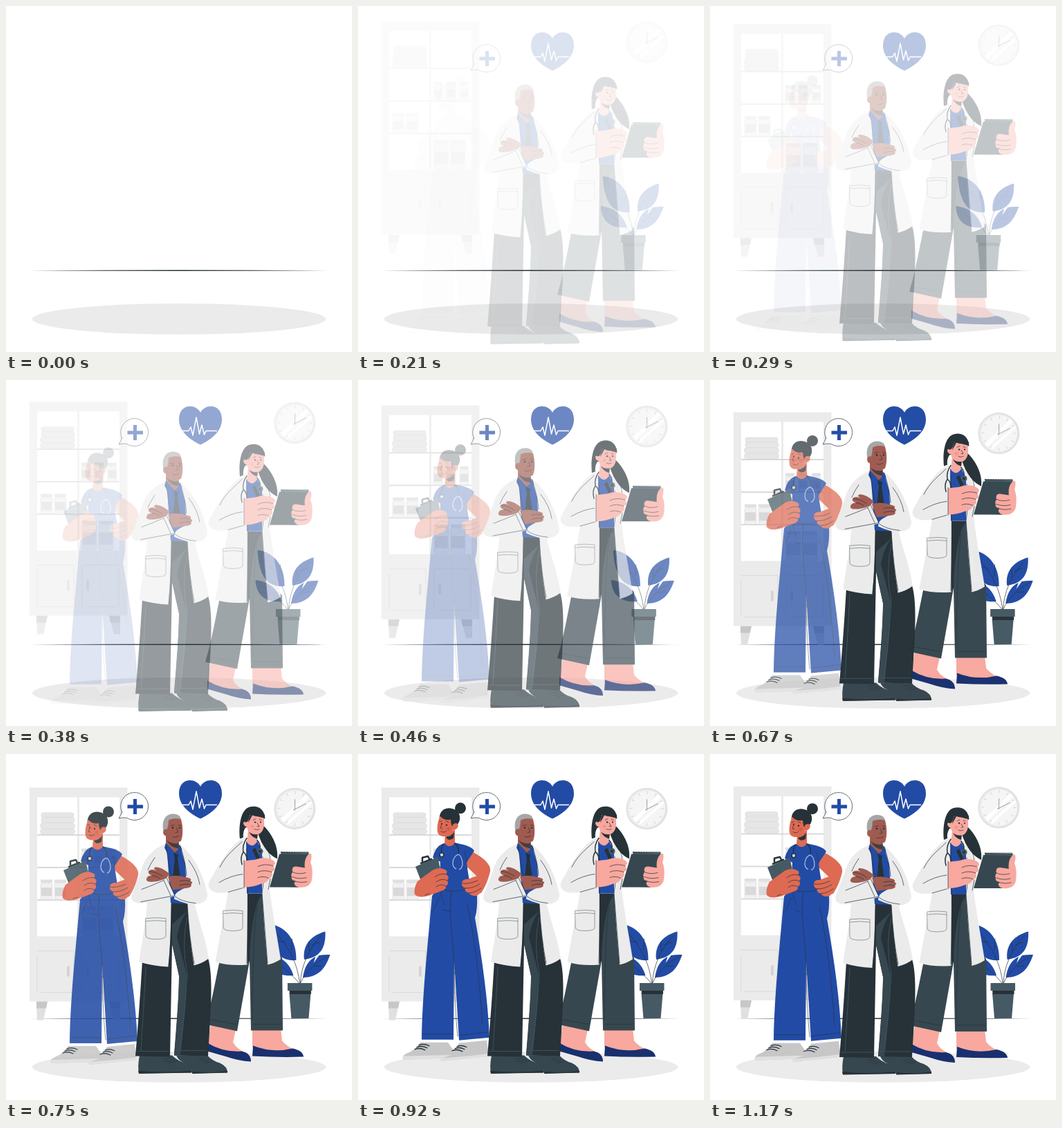
Recreate the animation shown at these times as an HTML page. Size 500 px wide and 500 px high, loop 1210 ms.

```html
<!DOCTYPE html>
<html lang="en">
<head>
<meta charset="utf-8">
<title>Medical team</title>
<style>
html, body { margin: 0; width: 100%; height: 100%; overflow: hidden; background: #fff }
svg { display: block; width: 100vw; height: 100vh }
.blue { fill: #224ba5 } .dark { fill: #263238 } .slate { fill: #37474f } .steel { fill: #455a64 }
.coat { fill: #ebebeb } .white { fill: #fff }
.tan { fill: #de6a53 } .brown { fill: #9f5b50 } .pink { fill: #f8a89f } .navy { fill: #19306f }
.ln { fill: none; stroke: #263238; stroke-width: .7; stroke-linecap: round; stroke-linejoin: round }
.soft { fill: none; stroke: #7d878c; stroke-width: .8; stroke-linecap: round }
.pale { fill: none; stroke: #d6d6d6; stroke-width: .9 }
</style>
</head>
<body>
<svg viewBox="0 0 500 500">
<ellipse cx="250" cy="452.3" rx="212" ry="22.4" fill="#ebebeb"/>
<path class="dark" d="M35 382.3Q250 380.9 465 382.3Q250 383.8 35 382.3Z"/>

<g id="shelf">
  <path fill="#e0e0e0" d="M44 356H60L54 383H45ZM149 356H165V383H156Z"/>
  <path fill="#c7c7c7" d="M44 356H60L58 366H44ZM149 356H165V366H151Z"/>
  <path class="coat" d="M34 47H175.500V356H34Z"/>
  <path class="white" d="M45 61H103V262H45ZM106 61H164V262H106Z"/>
  <path stroke="#d9d9d9" stroke-width="2" d="M45 115.500H164M45 162.500H164M45 209.500H164"/>
  <path class="pale" d="M45 343V290M45 283H98V335M50 343H98M110 343V283H163M163 290V343H118"/>
  <path fill="#d4d4d4" d="M88 305h4v15h-4zM116 305h4v15h-4z"/>
  <g fill="#e6e6e6" stroke="#dbdbdb" stroke-width=".7">
    <rect x="51" y="83.500" width="47" height="7" rx="3"/><rect x="51" y="90" width="48" height="8" rx="3.500"/>
    <rect x="49.500" y="98" width="50" height="8.500" rx="4"/><rect x="49.500" y="106.500" width="50" height="8" rx="4"/>
  </g>
  <g id="jars"></g>
</g>

<g id="clock">
  <circle cx="417.300" cy="77.500" r="30" fill="#e0e0e0"/>
  <circle cx="416.800" cy="77.500" r="28" fill="#ebebeb"/>
  <circle cx="417.800" cy="77.500" r="26" fill="#f5f5f5"/>
  <path class="white" d="M397 93L434 57L438 61L401 97ZM404 99L441 66L442 70L407 101Z"/>
  <circle cx="417.500" cy="77.500" r="23" fill="none" stroke="#d0d0d0" stroke-width="4" stroke-dasharray=".9 11.143" transform="rotate(-1 417.500 77.500)"/>
  <path fill="none" stroke="#a6a6a6" stroke-width="1.100" d="M417.500 80V64M415 79.500L434 70"/>
</g>

<g id="heart">
  <path class="blue" d="M281 47C275 34 250 33 250 57C250 75 267 87 281 93.500C295 87 312 75 312 57C312 33 287 34 281 47Z"/>
  <path fill="none" stroke="#fff" stroke-width="1.500" stroke-linejoin="round" d="M255 73.500H264L267 68L270 80L275 54L279.500 78L283 65L286.500 79L289 73.500H305"/>
</g>

<g id="bubble">
  <path class="ln" style="fill:#fff" d="M167.500 84A20 20 0 1 1 174.500 92.200Q169 91.500 163 93Q166 89 167.500 84Z"/>
  <path class="blue" d="M184 65h5v8.500h9v5h-9V87h-5V78.500h-8.500v-5H184Z"/>
</g>

<g id="plant">
  <path class="blue" d="M418 298C392 300 381 282 379 246C402 248 419 268 418 298ZM429.500 297C427 275 440 262 460 256.500C461 280 453 294 429.500 297ZM427.500 323C430 306 437 297 446 293L443 302L451 291Q459 289.500 467 290C460 311 449 323 427.500 323ZM414 320C394 322 377 314 376 289C395 291 409 302 414 320Z"/>
  <path class="ln" d="M423 331C420 305 409 278 384 254M424 331C425 308 435 282 455 262M424 331C432 315 445 302 462 293M422 331C412 318 396 306 380 294M411 283L412 267M402 272L389 270M437 284L436 273M441 276L452 272M444 307L454 306"/>
  <path class="steel" d="M408 346H439L436 382H411Z"/>
  <path class="dark" d="M408 341H439.500V347H408.500Z"/>
  <path class="steel" d="M405.500 331H441V342H405.500Z"/>
</g>

<g id="woman">
  <path class="pink" d="M296 392L332 400L328 418Q333 427 342 431Q318 441 291 423ZM356 398H397L399 416Q406 424 415 428Q385 439 356 426Z"/>
  <path class="navy" d="M291 419Q314 433 341 431Q354 434 354 446Q336 445 319 439L291 431ZM357 423Q385 434 414 427Q429 430 430 439Q392 440 356 438Z"/>
  <path class="slate" d="M349 203H371C374 244 380 275 399 296L400 401H354L352 300L334 402L288 392C302 345 306 302 320 255Z"/>
  <path class="dark" d="M349 203H371L364 214Q353 248 352 300L348 304Z"/>
  <path class="ln" d="M293 385L333 392M357 392H397M363 222Q357 250 356 385"/>
  <path class="coat" d="M343 123C325 131 305 165 293 188C290 201 307 204 321 201C315 236 308 270 302.500 302Q322 308 348.500 306L349 203H370Q373 254 378 306Q388 304 397 298C391 260 384 225 381 196L385 175C383 151 376 136 363 124Z"/>
  <path class="blue" d="M347 128L362 125L370 142V203H348Z"/>
  <path class="dark" d="M364 116C369 108 371 104 373 106C385 118 394 136 392 153C381 148 371 137 364 116Z"/>
  <path class="pink" d="M350 111L364 115L363 128Q356 139 348 129Z"/>
  <path class="dark" d="M351 114Q357 119 364 116L363 124Q355 122 351 114Z"/>
  <path class="dark" d="M338 124C336 105 339 82 352 78C363 75 373 80 374.500 94L367 101L346 108Q342 114 343 122Z"/>
  <path class="pink" d="M346 100C350 101 351 95 353 89Q362 93 372.500 92C374 104 373 113 366 117C358 119 350 116 348 107Q344 106 343 102Q343 98 346 100Z"/>
  <path class="dark" d="M350 101Q351 92 356 84L374 89L373 94Q363 92 357 88Q354 94 350 101Z"/>
  <path class="ln" d="M357 97L361 95M366 96L369 97M363 101L366 106L363 106M359 110Q362 112 366 110"/>
  <circle class="dark" cx="360" cy="100" r="1.200"/><circle class="dark" cx="368" cy="100" r="1.100"/>
  <circle cx="356" cy="106" r="2.200" fill="#f08379" opacity=".6"/>
  <path class="ln" d="M341 128C334 136 318 146 309 165M308 187Q325 177 342 175M321 201L342 195M348 138Q351 225 348 304M371 150Q374 180 370 203L378 304M369 128Q381 140 382 154M382 182L379 197"/>
  <path class="ln" style="stroke-width:1.500" d="M348 123Q341 133 343 143M343 143Q338 150 341 161M343 143Q349 146 348 160M363 126Q370 134 365 143"/>
  <circle class="steel" cx="367" cy="142" r="4.500"/><circle class="dark" cx="367" cy="142" r="2"/>
  <path class="dark" d="M356 140L360 137L377 174L373 177Z"/>
  <path class="soft" d="M314 228Q328 226 342 228V252Q342 257 328 257Q314 257 314 252ZM314 232Q328 230 342 232"/>
  <g transform="translate(-2 0)">
    <path class="steel" d="M400 143L440 144L426 194L384 193Z"/>
    <path class="slate" d="M397 146L438 147L424 194H383Z"/>
    <path fill="none" stroke="#263238" stroke-width="2" stroke-dasharray="1.200 1.200" d="M399 143.500H439"/>
  </g>
  <path class="pink" d="M432 166C430 153 436 146 440 145Q443 147 440 158Q444 167 442 183C440 194 428 196 420 193Q414 189 419 185Q411 184 413 179Q411 177 414 172Q412 164 419 164Z"/>
  <path class="ln" d="M414 172Q422 176 433 173M414 179Q424 183 434 180M419 186Q427 188 435 186"/>
  <path class="pink" d="M344 156L361 154Q373 149 386 155Q392 160 386 163Q391 169 384 172Q387 179 380 181Q379 187 369 189Q357 194 344 194Z"/>
  <path class="ln" d="M386 163Q374 159 364 164M384 172Q373 168 364 172M380 181Q372 177 364 180M344 155V195"/>
</g>

<g id="nurse">
  <path fill="#c7c7c7" d="M90 418H130L137 428Q139 434 132 437L121 441L66 443Q61 437 75 432Q84 427 90 418ZM146 419L186 415L189 438L121 445Q114 439 132 433Q141 430 146 419Z"/>
  <path fill="#e0e0e0" d="M65 438L135 436L121 441L66 443ZM118 441Q155 439 189 434V438L120 445Z"/>
  <path class="ln" style="stroke-width:1.300" d="M82 428Q89 425 97 429M85 425Q92 422 100 426M88 422Q95 419 103 423M136 430Q143 427 151 431M140 427Q147 424 154 428M143 424Q150 421 157 425"/>
  <path class="tan" d="M160 140C181 150 193 161 191 171C188 184 183 195 178 202L165 206L157 196L172 178L153 160Z"/>
  <path class="blue" d="M118 193H160L172 205Q173 226 169 238C180 300 188 360 190 411L146 415L139 300L138 414L92 414C93 350 100 285 107 206Z"/>
  <path class="blue" d="M122 131Q112 135 108 151L119 157L117 206L168 207Q161 192 157 158L168 141C163 134 153 132 137 129Z"/>
  <path class="ln" d="M116 195Q140 204 160 195M120 197Q120 212 126 220M135 200Q131 225 138 285M138 285L140 320M139 316Q140 370 144 409M94 406H137M146 408L188 403M117 208Q113 222 108 228M158 220Q173 286 180 392M122 226L133 229M157 158Q156 147 154 143" opacity=".85"/>
  <path class="tan" d="M126 118L140 110L140 130Q132 139 125 130Z"/>
  <path class="dark" d="M127 121Q134 121 139 114L138 123Q130 128 127 121Z"/>
  <circle class="dark" cx="148" cy="79.500" r="8"/>
  <path class="dark" d="M118 91C120 79 132 77 141 82C149 87 149 98 143 104L137 106L134 96Z"/>
  <path class="tan" d="M119 90Q125 96 134 95Q135 101 137 103Q143 99 145 104Q144 111 137 111C134 120 123 123 117 118C113 114 114 101 119 90Z"/>
  <path class="dark" d="M117 94Q120 82 130 84L139 99L136 106Q134 101 134 96Q124 98 119 91Z"/>
  <path class="ln" d="M118 99L121 98M127 98L131 100M121 103L119 108L122 109M120 113Q125 116 128 112"/>
  <circle class="dark" cx="121" cy="102" r="1.100"/><circle class="dark" cx="128" cy="104" r="1.200"/>
  <circle cx="131" cy="109" r="2.300" fill="#c94e3d" opacity=".6"/>
  <path class="ln" style="stroke-width:1.400" d="M124 131Q119 138 121 145M140 130Q147 136 145 146"/>
  <path fill="none" stroke="#a7b7db" stroke-width="1.300" d="M145 146Q137 149 137 160Q138 166 142 167M145 146Q151 150 151 161Q150 167 146 168"/>
  <circle class="dark" cx="121" cy="147" r="3.800"/><circle cx="121" cy="147" r="2.200" fill="#c9d2e8"/>
  <path class="steel" d="M83 164L115 150L124 190L99 205Z"/>
  <path class="ln" style="stroke-width:2.500" d="M91 159L106 153M93 156L93 151L101 149L103 153"/>
  <path class="tan" d="M86 185Q98 176 108 169Q118 164 125 168Q131 170 127 175Q133 178 129 184Q132 189 127 192Q128 197 121 199L105 205Q88 211 82 204Q80 196 86 185Z"/>
  <path class="ln" d="M127 175Q119 173 111 179M129 184Q121 180 113 186M127 192Q120 188 113 193M97 205L103 203"/>
  <path class="tan" d="M150 187Q151 182 159 182L173 177Q183 181 181 191Q180 200 172 206Q163 207 160 202Q153 200 155 195Q149 193 150 187Z"/>
  <path class="ln" d="M150 188Q160 190 173 184M155 195Q165 196 176 189M160 202Q169 202 178 195"/>
</g>

<g id="man">
  <path class="slate" d="M193 437L240 437Q247 444 258 448Q268 453 268 462L192 463Q190 452 193 437ZM246 437L291 437Q298 445 309 448Q320 453 320 462L269 463Q267 452 256 447Q249 444 246 437Z"/>
  <path class="dark" d="M191 459Q230 463 268 459V462L192 463.500ZM269 460Q298 463 320 459V462L269 463.500Z"/>
  <path class="ln" d="M227 443L239 440M231 446L243 443M236 448L247 445M279 443L290 440M283 446L294 443M288 448L298 445"/>
  <path class="dark" d="M239 216H263C270 252 286 278 293 300C300 330 295 385 292 438L243 437C246 398 250 350 250 322L240 276L237 439L187 438C191 392 194 350 197 300Z"/>
  <path class="slate" d="M262 228Q250 245 247 266L261 320Q259 375 252 437H243Q250 360 250 322L240 276V248Z"/>
  <path class="soft" d="M202 309Q199 370 195 430M190 431H235M246 430H290M262 237Q253 275 262 320Q259 375 252 428" style="stroke:#455a64"/>
  <path class="coat" d="M233 130C210 139 199 154 195 171L182 204C178 217 192 219 204 216C202 250 195 278 192.500 302Q212 308 234.500 309C238 280 238 245 239 216H262Q264 260 271.500 307Q284 304 293 297C288 265 277 240 273 219Q291 217 291 205C286 176 272 148 251 132Z"/>
  <path class="blue" d="M232 131L251 133L259 160L262 218L238 217Z"/>
  <path class="dark" d="M242 144L249 147L248 153L252 181H241L244 153Z"/>
  <path class="brown" d="M231 112L250 125L249 140L243 144L231 133Z"/>
  <path class="dark" opacity=".75" d="M232 126Q241 133 250 130L249 138Q238 137 232 126Z"/>
  <path class="blue" d="M231 130L243 143L237 152L229 137ZM251 133L247 143L252 151L254 139Z"/>
  <path fill="#a6a6a6" d="M227 111C225 96 231 88 242 88C250 88 254 93 253 99L236 106L233 119L229 117Z"/>
  <path class="brown" d="M233 110Q235 103 235 97Q244 93 253 96C256 107 256 119 253 127C247 132 236 129 233 120Q227 120 227 114Q228 109 233 110Z"/>
  <path class="ln" d="M238 105L243 104M249 104L253 105M246 108L249 114L245 115M241 121Q245 123 250 120"/>
  <circle class="dark" cx="241" cy="108" r="1.300"/><circle class="dark" cx="251" cy="108" r="1.200"/>
  <path class="ln" d="M231 133Q235 160 239 178M252 134Q260 160 261 177M215 151Q208 161 205 169M262 219Q265 270 272 304M239 218Q239 270 235 307M264 155Q277 172 280 190"/>
  <path class="coat" d="M267 190Q279 197 274 219Q260 219 243 211Q243 203 251 199Z"/>
  <path class="coat" d="M184 202Q199 197 232 180L244 207L204 216Q179 220 184 202Z"/>
  <path class="brown" d="M234 179Q246 175 262 180Q270 182 266 185Q272 187 267 190Q270 193 263 195L241 198Z"/>
  <path class="brown" d="M203 182Q204 177 211 177Q203 174 207 170Q210 167 218 170Q211 167 216 165Q224 164 237 175L230 182Q217 187 207 186Q202 185 203 182Z"/>
  <path class="ln" d="M207 171Q218 172 226 178M211 177Q217 177 222 181M266 185Q259 183 251 185M267 190Q259 188 251 191M195 215L244 206L232 180M228 184L238 206M196 197Q212 191 228 184M244 207Q253 215 274 217"/>
  <path class="soft" d="M202 239Q217 237 231 239V264Q231 269 217 269Q202 269 202 264ZM202 243Q217 241 231 243"/>
</g>
</svg>
<script>
const $ = id => document.getElementById(id);

// [left, top, width, height] of each jar on the shelves
const jars = [[50, 180, 17, 29], [70, 180, 17, 29], [109, 135, 13, 27], [128, 135, 13, 27], [147, 135, 13, 27], [110, 219, 21, 42], [134, 219, 21, 42]];
$("jars").innerHTML = jars.map(([x, y, w, h]) => `
  <rect x="${x}" y="${y + 5}" width="${w}" height="${h - 5}" rx="2.500" fill="#f0f0f0" stroke="#dbdbdb" stroke-width=".7"/>
  <rect x="${x}" y="${y}" width="${w}" height="4.500" rx="1" fill="#e0e0e0"/>
  <rect x="${x + 1}" y="${y + h * .4}" width="${w - 2}" height="${h * .42}" fill="#d9d9d9"/>`).join("");

// id: [start x, start y, delay in ms]
const entries = {
  shelf: [0, -30, 0], clock: [0, -30, 0], heart: [0, 0, 0], bubble: [0, 0, 0],
  plant: [-30, 0, 0], woman: [0, 30, 0], nurse: [0, 30, 180], man: [0, 30, 0]
};
const LOOP = 1210, FPS = 24, DURATION = 1000;

const bezier = (a, b, s) => 3 * (1 - s) * s * ((1 - s) * a + s * b) + s ** 3;

// cubic-bezier(.36, -.01, .5, 1.38)
function ease(x) {
  if (x <= 0) return 0;
  if (x >= 1) return 1;
  let low = 0, high = 1;
  for (let i = 0; i < 24; i++) {
    const mid = (low + high) / 2;
    if (bezier(.36, .5, mid) < x) low = mid; else high = mid;
  }
  return bezier(-.01, 1.38, low);
}

function draw(ms) {
  let step = Math.floor(ms * FPS / 1000 + .1);
  if (step < 3) step = 0; // the empty stage holds briefly
  const time = step * 1000 / FPS;
  for (const [id, [dx, dy, delay]] of Object.entries(entries)) {
    const p = ease((time - delay) / DURATION), left = 1 - p;
    const el = $(id);
    el.setAttribute("opacity", Math.max(0, Math.min(1, p)));
    el.setAttribute("transform", `translate(${dx * left} ${dy * left})`);
  }
}

const start = performance.now();
function tick() {
  draw((performance.now() - start) % LOOP);
  requestAnimationFrame(tick);
}
tick();
</script>
</body>
</html>
```
